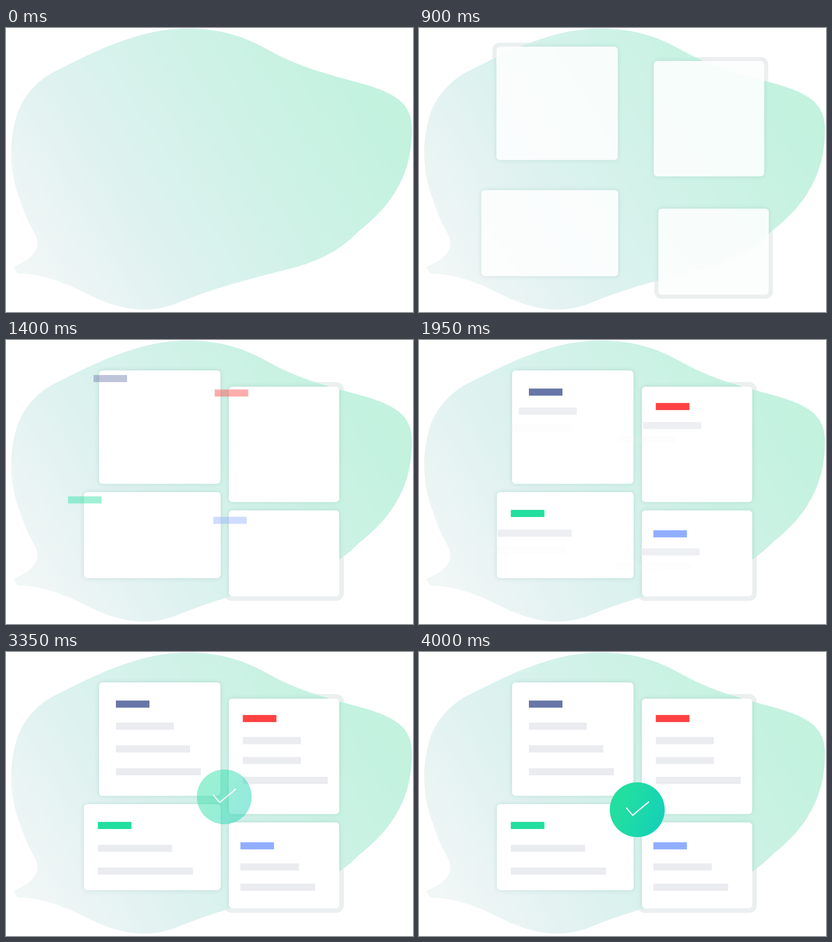
Write an HTML page that moves like this. It is 800 by 560 pixels and loops after 4800 ms.

```html
<!DOCTYPE html>
<html lang="en">
<head>
<meta charset="utf-8">
<title>Cards assemble</title>
<style>
  html, body { margin: 0; width: 100%; height: 100%; overflow: hidden; background: #fff; }
  svg { display: block; width: 800px; height: 560px; }
</style>
</head>
<body>
<svg viewBox="0 0 800 560" xmlns="http://www.w3.org/2000/svg">
  <defs>
    <linearGradient id="mint" gradientUnits="userSpaceOnUse" x1="100" y1="560" x2="740" y2="170">
      <stop offset="0" stop-color="#f1f6f6"/>
      <stop offset=".3" stop-color="#dff2f0"/>
      <stop offset=".65" stop-color="#cff2e7"/>
      <stop offset="1" stop-color="#c3f2df"/>
    </linearGradient>
    <linearGradient id="badgeFill" x1="0" y1=".3" x2="1" y2=".7">
      <stop offset=".2" stop-color="#22dfa0"/>
      <stop offset=".9" stop-color="#16d2b5"/>
    </linearGradient>
    <!-- soft shadow without the area under the card -->
    <filter id="halo" x="-20%" y="-20%" width="140%" height="140%">
      <feGaussianBlur stdDeviation="5"/>
      <feComposite operator="out" in2="SourceAlpha"/>
    </filter>
    <path id="blob" d="M358 1 C420 1 470 17 515 43 C570 74 620 88 690 107 C765 127 798 148 798 200
      C798 290 757 349 700 395 C665 427 645 448 575 470 C500 490 420 508 340 541
      C280 566 225 556 165 527 C110 499 75 486 22 484 L14 471 C40 462 62 445 62 423
      C61 405 45 395 28 340 C6 285 6 225 19 180 C30 137 60 105 95 86 C175 46 260 1 358 1Z"/>
    <clipPath id="inBlob"><use href="#blob"/></clipPath>
  </defs>
  <g id="rings"></g>
  <use href="#blob" fill="url(#mint)"/>
  <g id="shadows" clip-path="url(#inBlob)"></g>
  <g id="faces"></g>
  <g id="bars"></g>
  <g id="badge">
    <circle cx="429" cy="311" r="54" fill="url(#badgeFill)"/>
    <path d="M408 308 L420 322 L451 296" fill="none" stroke="#fff" stroke-width="2.6"
      stroke-linecap="round" stroke-linejoin="round"/>
  </g>
</svg>
<script>
const LOOP = 4800, STEP = 50;
const GREY = '#ebecf0';
const TITLE_WIDTH = 66;
const CARDS_IN = [0, 1200], BADGE_IN = [3000, 4000];
// title row, then the text rows
const ROWS_IN = [[1200, 1800], [1600, 2100], [1900, 2400], [2500, 3000]];

// inset: title within the card; first, pitch: spacing of the text rows below it;
// drift: where the card comes from; slide: how far left its bars start
const cards = [
  { box: [183, 60, 238.5, 223.5], drift: [-123, -93], slide: 66, color: '#6876a8',
    inset: [33, 35.7], first: 43.5, pitch: 45, widths: [114, 146, 167] },
  { box: [438, 92, 217, 227.5], drift: [94, -108], slide: 83, color: '#ff4242',
    inset: [27.5, 32.2], first: 43.5, pitch: 39.2, widths: [114, 114, 167] },
  { box: [153, 300, 269, 169.5], drift: [-122, 79], slide: 88, color: '#22df9f',
    inset: [27.5, 35], first: 45, pitch: 45, widths: [146, 187] },
  { box: [438, 336, 217, 169.5], drift: [130, 81], slide: 80, color: '#91adff',
    inset: [22.7, 39.2], first: 41.6, pitch: 40, widths: [115, 147] }
];

const $ = id => document.getElementById(id);

function set(el, attrs) {
  for (const key in attrs) el.setAttribute(key, attrs[key]);
  return el;
}

function addRect(layer, attrs) {
  const el = document.createElementNS('http://www.w3.org/2000/svg', 'rect');
  return $(layer).appendChild(set(el, attrs));
}

const progress = (t, [a, b]) => Math.min(1, Math.max(0, (t - a) / (b - a)));
const fade = p => 1 - Math.pow(1 - p, 1.4);

function place(el, p, [dx, dy], opacity = fade(p)) {
  set(el, { transform: `translate(${dx * (1 - p)} ${dy * (1 - p)})`, opacity });
}

const bars = [];
for (const card of cards) {
  const [x, y, width, height] = card.box;
  const shape = { x, y, width, height, rx: 7 };
  card.ring = addRect('rings', { fill: '#ebefef' });
  card.shadow = addRect('shadows', { ...shape, fill: '#3f7f78', filter: 'url(#halo)' });
  card.face = addRect('faces', { ...shape, fill: '#fff' });

  const left = x + card.inset[0], top = y + card.inset[1];
  [TITLE_WIDTH, ...card.widths].forEach((width, row) => {
    const down = row && card.first + card.pitch * (row - 1);
    bars.push({
      time: ROWS_IN[row],
      from: [-card.slide, row ? -20 : -40],
      el: addRect('bars', {
        x: left, y: top + down, width, height: 14, fill: row ? GREY : card.color
      })
    });
  });
}

function draw(t) {
  const p = progress(t, CARDS_IN);
  const rim = 4.5 + 4.5 * p;
  for (const { box: [x, y, w, h], drift, ring, shadow, face } of cards) {
    place(face, p, drift);
    place(shadow, p, drift, 0.2 * fade(p));
    place(ring, p, drift, Math.min(1, 2 * p));
    set(ring, {
      x: x - rim, y: y - rim, width: w + 2 * rim, height: h + 2 * rim, rx: 6 + rim
    });
  }
  for (const { el, time, from } of bars) place(el, progress(t, time), from);
  place($('badge'), progress(t, BADGE_IN), [0, -39]);
}

const origin = performance.now();
function tick() {
  const t = (performance.now() - origin) % LOOP;
  draw(Math.floor(t / STEP) * STEP);
  requestAnimationFrame(tick);
}
tick();
</script>
</body>
</html>
```
